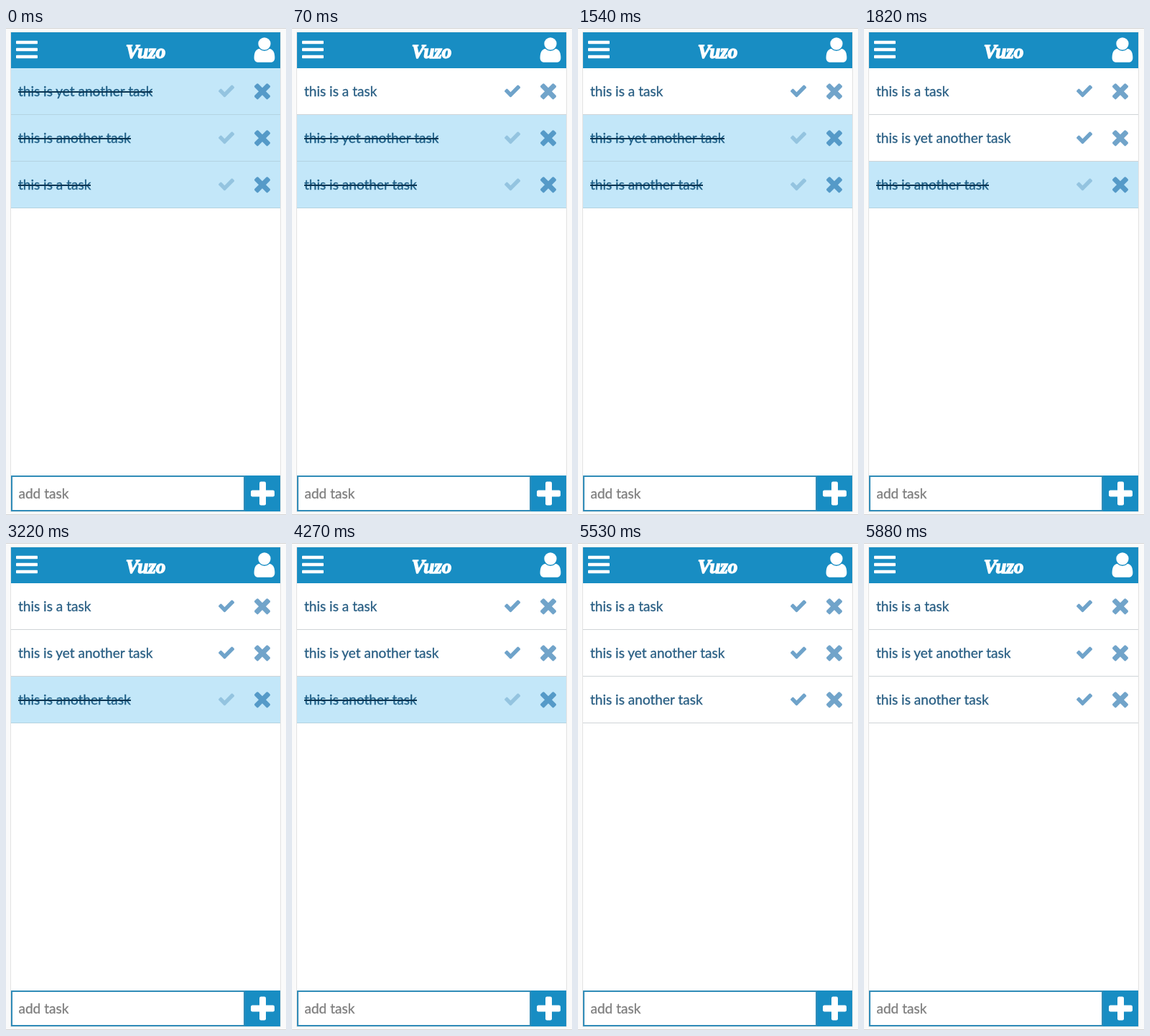
Animation of 390 by 678 pixels, one loop 6230 ms. Source, as an HTML page:

```html
<!DOCTYPE html>
<html lang="en">
<head>
<meta charset="utf-8">
<title>Task list</title>
<style>
  html, body { margin: 0; width: 100%; height: 100%; overflow: hidden; }
  body { position: relative; background: #fafafa; font: 19.05px Lato, sans-serif; }
  svg { position: absolute; left: 0; top: 0; }
  #tasks { position: absolute; left: 7px; top: 56px; width: 375px; }
  .task {
    position: relative; height: 64px; padding-left: 10px;
    border-bottom: 1px solid #cfd4d7; line-height: 64px; color: #2b6085;
  }
  .task span {
    position: relative; display: inline-block; white-space: nowrap;
    -webkit-text-stroke: .35px;
  }
  .task .check { fill: #6fa3ca; }
  .task .cross { fill: #71a4ca; }
  .done { background: #c3e7f9; border-color: #b4d3e1; color: #1f6088; }
  .done span::after {
    content: ""; position: absolute; left: 0; right: 0; top: 32px;
    height: 2px; background: #0a3552;
  }
  .done .check { fill: #94c4e0; }
  .done .cross { fill: #559ac8; }
  .hint { fill: #7f7f7f; stroke: #7f7f7f; stroke-width: .35; }
  .logo { font: italic bold 27px "Liberation Serif", serif; stroke: #fff; stroke-width: 1.5; }
</style>
</head>
<body>
<svg width="390" height="678" viewBox="0 0 390 678">
  <defs>
    <g id="plus">
      <rect x="-16.5" y="-4.5" width="33" height="9" rx="2.2"/>
      <rect x="-4.5" y="-16.5" width="9" height="33" rx="2.2"/>
    </g>
    <path id="check" d="M1671 566q0 40-28 68l-724 724-136 136q-28 28-68 28t-68-28l-136-136-362-362q-28-28-28-68t28-68l136-136q28-28 68-28t68 28l294 295 656-657q28-28 68-28t68 28l136 136q28 28 28 68z"/>
    <rect id="bar" x="14" width="30" height="4.6" rx=".8"/>
  </defs>
  <path d="M0 .5H390M0 677.5H390" stroke="#d4d4d4"/>
  <rect x="6.5" y="6" width="376" height="667" fill="#fff" stroke="#e2e2e2"/>
  <g fill="#188dc3">
    <rect x="7" y="6" width="375" height="50"/>
    <rect x="332" y="623" width="50" height="50"/>
  </g>
  <rect x="8" y="624" width="324" height="48" fill="#fff" stroke="#308cb8" stroke-width="2"/>
  <g fill="#fff">
    <use href="#bar" y="17.7"/>
    <use href="#bar" y="27.7"/>
    <use href="#bar" y="37.7"/>
    <text class="logo" x="194.5" y="42" text-anchor="middle">Vuzo</text>
    <g transform="translate(339.8 10.4) scale(.0225)">
      <circle cx="896" cy="512" r="384"/>
      <path d="M1536 1399q0 109-62.5 187t-150.5 78h-854q-88 0-150.5-78t-62.5-187q0-85 8.5-160.5t31.5-152 58.5-131 94-89 134.5-34.5q131 128 313 128t313-128q76 0 134.5 34.5t94 89 58.5 131 31.5 152 8.5 160.5z"/>
    </g>
    <use href="#plus" x="357.5" y="648"/>
  </g>
  <text class="hint" x="17.5" y="655">add task</text>
</svg>
<div id="tasks"></div>
<script>
  const LOOP = 6230;
  const [first, second, third] = ["this is a task", "this is yet another task", "this is another task"];

  // Each phase lists the tasks in order; the first `open` of them are not done.
  const phases = [
    { start: 0, open: 0, tasks: [second, third, first] },
    { start: 70, open: 1, tasks: [first, second, third] },
    { start: 1820, open: 2, tasks: [first, second, third] },
    { start: 5530, open: 3, tasks: [first, second, third] }
  ];

  const row = (text, done) => `
    <div class="task ${done ? "done" : ""}"><span>${text}</span>
      <svg width="375" height="64">
        <use class="check" href="#check" transform="translate(287.3 18.7) scale(.0142)"/>
        <use class="cross" href="#plus" transform="translate(350 32.3) rotate(45) scale(.79)"/>
      </svg>
    </div>`;

  const list = document.getElementById("tasks");
  let shown;

  function draw() {
    const time = performance.now() % LOOP;
    const phase = phases.findLast(p => p.start <= time);
    if (phase !== shown) {
      list.innerHTML = phase.tasks.map((text, i) => row(text, i >= phase.open)).join("");
      shown = phase;
    }
    requestAnimationFrame(draw);
  }
  draw();
</script>
</body>
</html>
```
